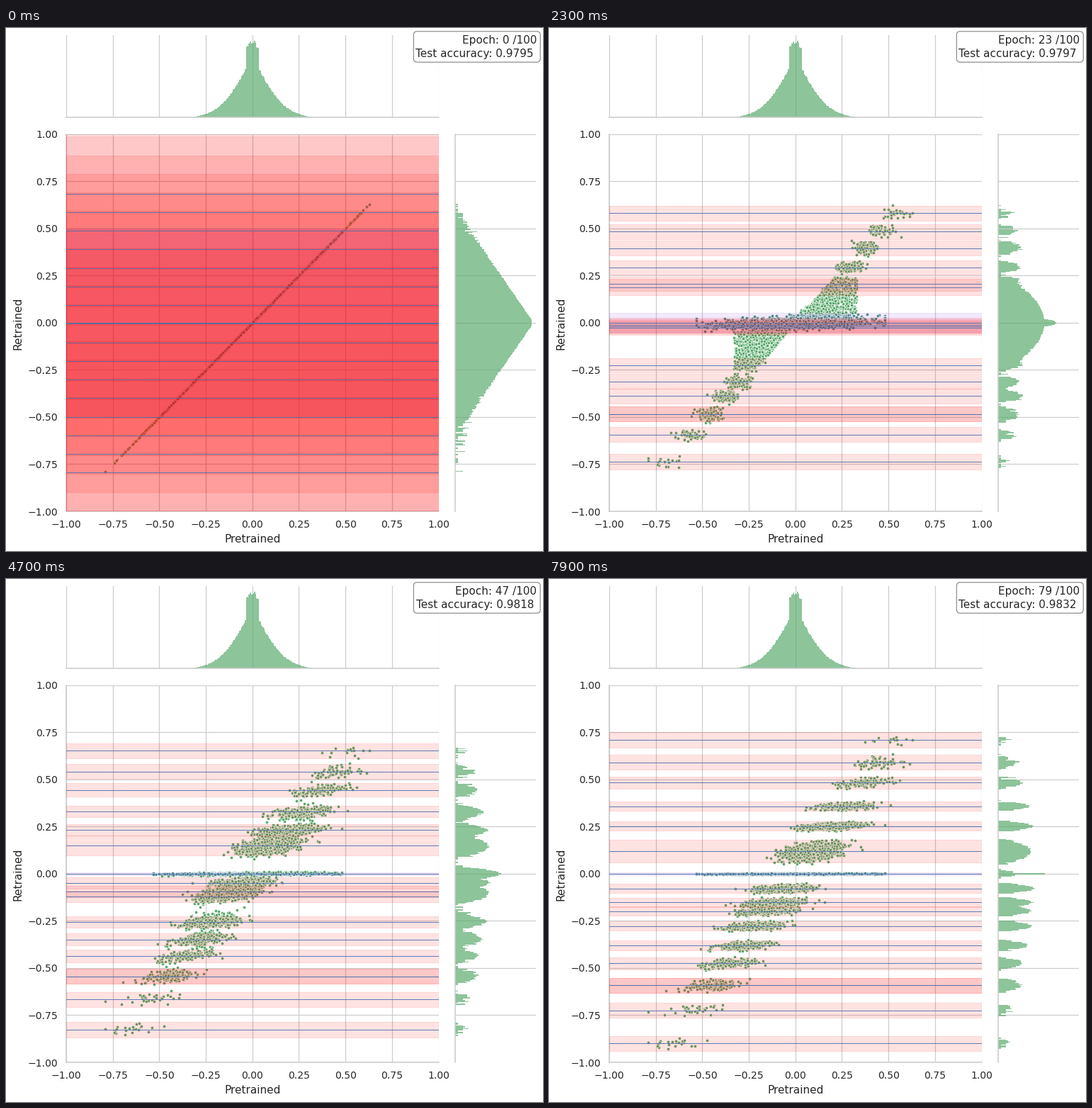
Write a matplotlib script that moves like this. It is 758x738 px and loops after 8000 ms.

```python
import numpy as np
import matplotlib.pyplot as plt
from matplotlib.animation import FuncAnimation
from matplotlib.patches import FancyBboxPatch

W, H, DPI = 758, 738, 100
FRAMES, INTERVAL = 80, 100
GREEN, TEAL, BLUE = "#55a868", "#43957f", "#4c72b0"
GRID, INK = "#cccccc", "#262626"
SETTLED = 14  # epoch at which the bands have shrunk to size
ZERO, WIDE = 6, 5  # the cluster pinned at zero and the broad one above it
rng = np.random.default_rng(7)

plt.rcParams.update({"font.family": "DejaVu Sans", "text.color": INK,
                     "axes.labelcolor": INK, "axes.axisbelow": True})


def px(n):
    return n * 72 / DPI


def lerp(a, b, f):
    return a + (b - a) * f


def smooth(f):
    f = np.clip(f, 0, 1)
    return f * f * (3 - 2 * f)


def shrink(epoch):
    """Progress of the quick first phase."""
    return np.sqrt(min(epoch / SETTLED, 1))


def spread_out(epoch):
    """Progress of the slow second phase."""
    u = max(0, (epoch - SETTLED) / (FRAMES - 1 - SETTLED))
    return (smooth(u) + np.sin(u * np.pi / 2)) / 2


# --- clusters: evenly spaced, then pulled inwards, then spread out --------
late = np.array([.71, .59, .483, .358, .252, .118, 0, -.078, -.152, -.198,
                 -.277, -.38, -.475, -.592, -.592, -.725, -.9])
early = np.where(np.abs(late) > .22, late / 1.265, 0)
early[WIDE] = early[WIDE - 1]
start = np.insert(np.linspace(.685, -.795, 16), ZERO, 0)
late_half = np.clip(.068 * np.abs(late), .024, .04)
late_half[WIDE] = .06


def clusters(epoch):
    """Centre, band half-width and cloud spread of every cluster."""
    p, q = shrink(epoch), spread_out(epoch)
    mid = lerp(lerp(start, early, p), late, q)
    half = lerp(.4 * .1**p, late_half, q)
    half[ZERO] = max(.008, .5 * .19**p * np.exp(-4.5 * q))
    spread = .4 * half
    spread[ZERO] = max(.0018, .02 * (1 - q / .75))
    return mid, half, spread


# --- points ---------------------------------------------------------------
sizes = 20 + 1400 * np.exp(-5 * late**2 - 2.5 * np.abs(late))
sizes[0], sizes[7:10] = 16, .6 * sizes[7:10]
home = np.repeat(np.arange(17), sizes.astype(int))
rng.shuffle(home)
n = len(home)
pinned = home == ZERO
dev = rng.normal(0, 1, n)
xs = np.clip(.75 * late[home] + np.where(pinned, .2, .075) * dev, -.79, .69)
xs[pinned] = xs[pinned].clip(-.53, .48)
lift = np.clip(.35 * dev + .93 * rng.normal(0, 1, n), -2.8, 2.8)

# At first small weights are pulled towards zero and large ones snap.
pull = np.where(np.abs(xs) < .33, rng.uniform(.15, 1.15, n), 1 + .06 * rng.normal(0, 1, n))
first_y = xs * pull
snapped = np.abs(first_y) > .24
near = np.abs(first_y[:, None] - early).argmin(axis=1)
delay = rng.uniform(0, .3, n)


def heights(epoch):
    mid, _, spread = clusters(max(epoch, SETTLED))
    before = np.where(snapped, mid[near] + spread[near] * lift, first_y)
    after = mid[home] + spread[home] * lift
    move = np.where(pinned, 1, smooth((spread_out(epoch) - delay) / .45))
    return lerp(xs, lerp(before, after, move), shrink(epoch))


# --- histograms -----------------------------------------------------------
edges = np.linspace(-1, 1, 401)
bins = (edges[1:] + edges[:-1]) / 2
noise = rng.normal(0, 1, 400)
LOG = 9.5  # pixels per e-fold of the count


def side_lengths(ys, epoch):
    """Log-scaled bars: the points plus the dense core they hide."""
    p, q = shrink(epoch), spread_out(epoch)
    tent = np.minimum(108, 111 - 185 * np.abs(bins))
    bell = 68 - 150 * q**2 - 700 * (1 + 2 * q) * bins**2
    spike = 82 - 100 * max(0, q - .42) - 4.75 * (bins / .0115)**2
    core = np.exp((lerp(tent, np.maximum(bell, spike), p) - 4) / LOG)
    count = np.floor(np.maximum(core + .8 * np.sqrt(core) * noise, 0))
    count = np.maximum(count, np.histogram(ys, edges)[0])
    return np.where(count > 0, 4 + LOG * np.log(np.maximum(count, 1)), 0)


def top_heights():
    d = np.abs(bins)
    flank = (82 * np.exp(-(d / .13)**1.4) - 2) * (1 + .015 * noise)
    crown = np.where(d < .022, 105, 99) + 2 * noise.clip(-1.5, 1.5)
    return np.where(d < .036, crown, flank.clip(0))


keys = [0, 14, 23, 37, 57, 66, 79]
accuracy = np.interp(range(FRAMES), keys,
                     [.9795, .9820, .9797, .9812, .9824, .9829, .9832])

# --- static layout --------------------------------------------------------
fig = plt.figure(figsize=(W / DPI, H / DPI), dpi=DPI, facecolor="white")


def panel(left, top, right, bottom, spines):
    ax = fig.add_axes([left / W, 1 - bottom / H, (right - left) / W, (bottom - top) / H])
    for name, spine in ax.spines.items():
        spine.set_visible(name in spines)
        spine.set(color=GRID, linewidth=px(1.6))
    ax.tick_params(length=0, labelsize=px(14), labelcolor=INK)
    return ax


ticks = np.linspace(-1, 1, 9)
grid = dict(color=GRID, linewidth=px(1.2))
bar_style = dict(fill=True, color=GREEN, alpha=.67, linewidth=0)

main = panel(85, 149.7, 610.5, 682, ("left", "bottom"))
main.set(xlim=(-1, 1), ylim=(-1, 1), xticks=ticks, yticks=ticks)
for axis in (main.xaxis, main.yaxis):
    axis.set_major_formatter(lambda v, _: f"{v:.2f}".replace("-", "\u2212"))
main.tick_params(axis="x", pad=px(12))
main.tick_params(axis="y", pad=px(12))
main.grid(True, **grid)

top = panel(85, 10, 610.5, 126, ("bottom",))
top.set(xlim=(-1, 1), ylim=(0, 116), xticks=ticks, yticks=[])
top.tick_params(labelbottom=False)
top.grid(True, axis="x", **grid)
top.stairs(top_heights(), edges, **bar_style)

side = panel(634, 149.7, 748, 682, ("left",))
side.set(xlim=(0, 114), ylim=(-1, 1), xticks=[], yticks=ticks[1:])
side.tick_params(labelleft=False)
side.grid(True, axis="y", **grid)
bars = side.stairs(np.zeros(400), edges, orientation="horizontal", **bar_style)


def label(x, y, text="", size=15.2, **kw):
    return fig.text(x / W, 1 - y / H, text, fontsize=px(size), **kw)


label(347.7, 726, "Pretrained", ha="center", va="baseline")
label(17, 416.5, "Retrained", ha="center", va="center", rotation=90)

fig.add_artist(FancyBboxPatch(
    (580, H - 43.5), 169.5, 34, boxstyle="round,pad=4.7,rounding_size=5",
    transform=None, facecolor="white", edgecolor="#808080", linewidth=px(1.1)))
epoch_text = label(749.5, 22, ha="right", va="baseline", zorder=5)
score_text = label(745, 41, ha="right", va="baseline", zorder=5)

# --- moving parts ---------------------------------------------------------
inner, outer = (main.plot([], [], "o", color=c, markersize=px(4.3), zorder=2,
                          markeredgecolor="white", markeredgewidth=px(.6))[0]
                for c in (TEAL, GREEN))
bands = [main.axhspan(-.1, .1, color="#8030e0" if k == ZERO else "red",
                      alpha=.1 if k == ZERO else .115,
                      linewidth=px(1), zorder=3) for k in range(17)]
lines = [main.axhline(0, color=BLUE, linewidth=px(.9), zorder=4) for _ in range(17)]


def draw(epoch):
    mid, half, _ = clusters(epoch)
    ys = heights(epoch)
    tinted = np.abs(ys) < half[ZERO]
    inner.set_data(xs[tinted], ys[tinted])
    outer.set_data(xs[~tinted], ys[~tinted])
    bars.set_data(side_lengths(ys, epoch))
    for span, line, m, r in zip(bands, lines, mid, half):
        span.set(y=m - r, height=2 * r)
        line.set_ydata([m, m])
    epoch_text.set_text(f"Epoch: {epoch} /100")
    score_text.set_text(f"Test accuracy: {accuracy[epoch]:.4f}")
    return inner, outer, bars


anim = FuncAnimation(fig, draw, frames=FRAMES, interval=INTERVAL,
                     blit=False, repeat=True, repeat_delay=0)
plt.show()
```
